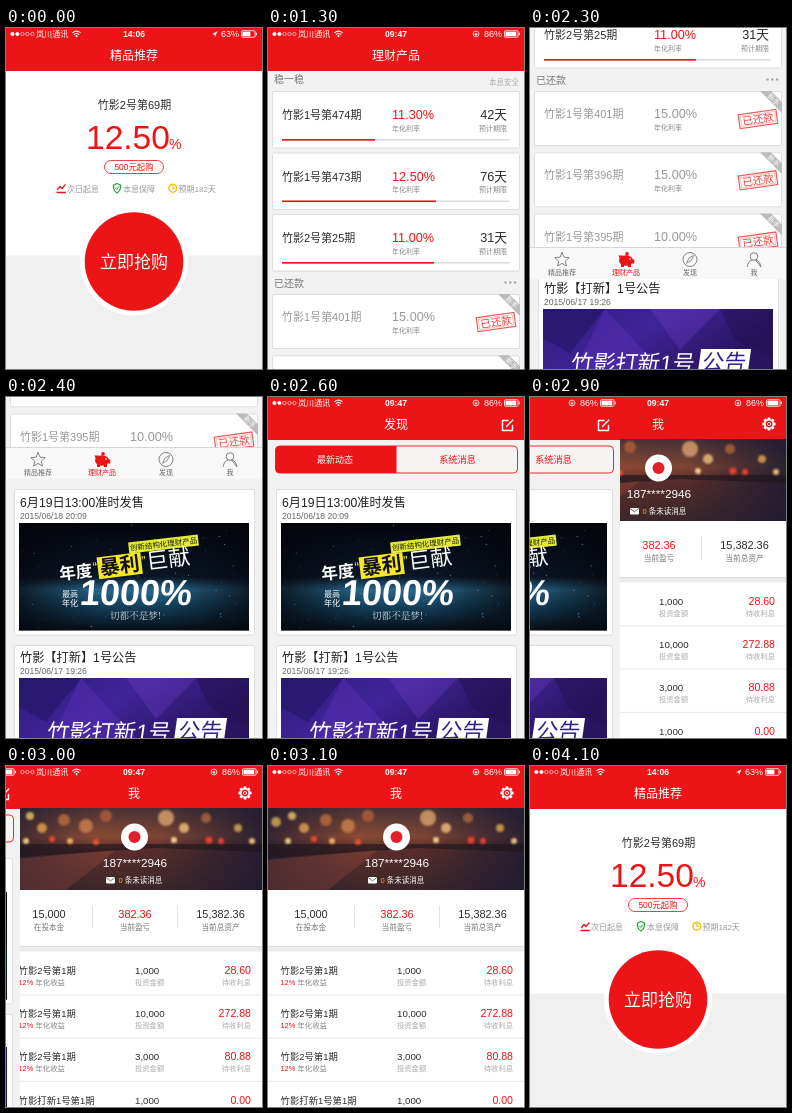
Write an HTML page that moves like this. It is 256x341 px and loops after 4.4 s.

```html
<!DOCTYPE html>
<html lang="zh-CN">
<head>
<meta charset="utf-8">
<title>理财产品</title>
<style>
html, body { margin: 0; width: 100%; height: 100%; overflow: hidden; background: #fff; }
svg { display: block; width: 256px; height: 341px; }
text { font-family: "Liberation Sans", "Noto Sans CJK SC", "Noto Sans CJK", sans-serif; white-space: pre; }
.serif { font-family: "Noto Serif CJK SC", "Noto Sans CJK SC", "Noto Serif", serif; }
.medium { font-weight: 500; }
.bold { font-weight: bold; }
.line { fill: none; stroke-linecap: round; stroke-linejoin: round; }

#home, #list, #news { animation: 4.4s step-end infinite; }
#home { animation-name: home; }
#list { animation-name: list; }
#news { animation-name: news; }
@keyframes home {
  0% { visibility: visible; }
  29.54% { visibility: hidden; }
  93.18%, 100% { visibility: visible; }
}
@keyframes list {
  0% { transform: translateY(0); }
  52.27% { transform: translateY(-203px); }
  54.54% { transform: translateY(-372px); }
  56.81% { transform: translateY(-444px); }
  59.09%, 100% { transform: translateY(-456px); }
}
@keyframes news {
  0% { transform: translateX(0); }
  61.36% { transform: translateX(-5px); }
  63.63% { transform: translateX(-57px); }
  65.9% { transform: translateX(-166px); }
  68.18% { transform: translateX(-242px); }
  70.45%, 100% { transform: translateX(-258px); }
}
</style>
</head>
<body>
<svg id="stage" viewBox="0 0 256 341">
  <defs>
    <linearGradient id="street" x1="0" y1="0" x2="0" y2="1">
      <stop offset="0" stop-color="#4a3236"/>
      <stop offset=".35" stop-color="#8a4a33"/>
      <stop offset=".5" stop-color="#5c2f2b"/>
      <stop offset="1" stop-color="#3d2629"/>
    </linearGradient>
    <linearGradient id="dusk">
      <stop offset="0" stop-color="#1b1a30" stop-opacity=".75"/>
      <stop offset=".35" stop-color="#1b1a30" stop-opacity="0"/>
      <stop offset=".6" stop-color="#1b1a30" stop-opacity=".1"/>
      <stop offset="1" stop-color="#1b1a30" stop-opacity=".85"/>
    </linearGradient>
    <linearGradient id="space" x1="0" y1="0" x2="0" y2="1">
      <stop offset="0" stop-color="#05060c"/>
      <stop offset=".5" stop-color="#0a1626"/>
      <stop offset=".62" stop-color="#28668a"/>
      <stop offset=".76" stop-color="#15435f"/>
      <stop offset="1" stop-color="#060d16"/>
    </linearGradient>
    <linearGradient id="edges">
      <stop offset="0" stop-color="#05060c" stop-opacity=".75"/>
      <stop offset=".35" stop-color="#05060c" stop-opacity="0"/>
      <stop offset=".65" stop-color="#05060c" stop-opacity="0"/>
      <stop offset="1" stop-color="#05060c" stop-opacity=".75"/>
    </linearGradient>
    <linearGradient id="violet" x1="0" y1="0" x2="1" y2=".4">
      <stop offset="0" stop-color="#2f1c7c"/>
      <stop offset=".5" stop-color="#3f2498"/>
      <stop offset="1" stop-color="#28145f"/>
    </linearGradient>
    <clipPath id="photoClip"><rect y="42" width="256" height="82"/></clipPath>
    <filter id="soft"><feGaussianBlur stdDeviation=".8"/></filter>
  </defs>
</svg>
<script>
const RED = '#ec1417', GREY = '#999', DARK = '#2b2b2b';
const MEDIUM = 'class="medium"', BOLD = 'class="bold"';

const text = (x, y, size, fill, str, extra = '') =>
  `<text x="${x}" y="${y}" font-size="${size}" fill="${fill}" ${extra}>${str}</text>`;
const mid = (x, y, size, fill, str, extra = '') => text(x, y, size, fill, str, 'text-anchor="middle" ' + extra);
const end = (x, y, size, fill, str) => text(x, y, size, fill, str, 'text-anchor="end"');
const rect = (x, y, w, h, fill, extra = '') =>
  `<rect x="${x}" y="${y}" width="${w}" height="${h}" fill="${fill}" ${extra}/>`;
const circle = (x, y, r, fill, extra = '') =>
  `<circle cx="${x}" cy="${y}" r="${r}" fill="${fill}" ${extra}/>`;
const line = (d, color, width = 1) =>
  `<path class="line" d="${d}" stroke="${color}" stroke-width="${width}"/>`;
const at = (x, y, body, rot = 0) => `<g transform="translate(${x} ${y}) rotate(${rot})">${body}</g>`;
const slant = (x, y, body, deg = -8) => `<g transform="translate(${x} ${y}) skewX(${deg})">${body}</g>`;
const times = (n, fn) => Array.from({ length: n }, (_, i) => fn(i)).join('');
const card = (x, y, w, h) => rect(x + .5, y + .5, w - 1, h - 1, '#fff', 'rx="1.5" stroke="#dedede"');

function header(title, time, charge, locked) {
  const mark = locked
    ? circle(208, 6, 2.9, 'none', 'stroke="#fff" stroke-width=".8"') + rect(206.8, 5.4, 2.4, 2, '#fff')
    : '<path d="M206 6.3 211.4 3.2 209 9 208.4 6.6Z" fill="#fff"/>';
  const shift = locked ? 1 : 0;
  return rect(0, 0, 256, 43, RED) +
    times(5, i => circle(6.4 + i * 5, 6, 1.7, i < 2 ? '#fff' : 'none', 'stroke="#fff" stroke-width=".6"')) +
    text(30, 9, 8.1, '#fff', '岚川通讯') +
    line('M66.8 4.6Q70.5 1.6 74.2 4.6M68.2 6.4Q70.5 4.6 72.8 6.4', '#fff', 1.1) + circle(70.5, 8.2, 1.1, '#fff') +
    mid(128, 9, 8.6, '#fff', time, BOLD) +
    mark + text(215 + shift, 9, 9, '#fff', charge + '%') +
    at(235.5 + shift, 2.7, rect(0, 0, 13.5, 6.6, 'none', 'rx="1" stroke="#fff" stroke-width=".8"') +
      rect(1, 1, charge * .125, 4.6, '#fff') + rect(14.2, 2, 1.2, 2.6, '#fff')) +
    mid(128, 32, 12, '#fff', title, MEDIUM);
}

function home() {
  const perk = (x, str) => text(x, 163.5, 8, GREY, str);
  return rect(0, 0, 256, 341, '#fff') + header('精品推荐', '14:06', 63) +
    mid(128.5, 81, 11, DARK, '竹影2号第69期') +
    text(80, 121, 33.5, RED, '12.50') + text(163, 121, 14, RED, '%') +
    rect(98.5, 132.5, 59, 13, '#fff', `rx="6.5" stroke="${RED}" stroke-width=".8"`) +
    mid(128, 142, 8.4, RED, '500元起购') +
    line('M51.5 161.5 54 158.5 56 160.5 59 156.8M51 164.5H59.5', RED, 1.3) + perk(61, '次日起息') +
    line('M111 155.5 114.5 157V160Q114 163.2 111 165 108 163.2 107.5 160V157Z', '#23a638', 1.3) +
    line('M109.4 160 110.7 161.4 112.8 158.8', '#23a638') + perk(117, '本息保障') +
    circle(166.8, 160.3, 3.9, '#fff', 'stroke="#f5c518" stroke-width="1.6"') +
    line('M166.8 158V160.5H168.6', '#f0b400') + perk(172.5, '预期182天') +
    rect(0, 227.5, 256, 114, '#f0f0f0') +
    circle(128, 233.5, 54, '#fff') + circle(128, 233.5, 49.3, RED) +
    mid(128, 240, 17, '#fff', '立即抢购');
}

function product(y, name, rate, days, barEnd) {
  return card(4, y, 248, 57.5) +
    text(14, y + 28, 11, DARK, name) +
    text(124, y + 28, 12.7, RED, rate) + text(124, y + 39.5, 7, '#888', '年化利率') +
    end(239, y + 28, 12.7, DARK, days + '天') + end(239, y + 39.5, 7, '#888', '预计期限') +
    rect(14, y + 48, 227, 1.6, '#dcdcdc') + rect(14, y + 48, barEnd - 14, 1.6, RED);
}

function repaid(y, name, rate) {
  const stamp = rect(-19, -7, 38, 14, 'none', 'stroke="#ee5a58" stroke-width="1.2"') +
    rect(-17.2, -5.2, 34.4, 10.4, 'none', 'stroke="#f3908e" stroke-width=".5"') +
    mid(0, 3.8, 10.4, '#ea4340', '已还款', MEDIUM);
  return card(4, y, 248, 55) +
    text(14, y + 27, 11, GREY, name) +
    text(124, y + 27, 12.7, GREY, rate) + text(124, y + 39, 7, '#888', '年化利率') +
    `<path d="M230 ${y}H241L252 ${y + 11}V${y + 22}Z" fill="#bbb"/>` +
    at(243.7, y + 8.4, mid(0, 2.6, 7, '#fff', '新手'), 45) + at(228, y + 28, stamp, -8);
}

function tabBar(y) {
  const labels = ['精品推荐', '理财产品', '发现', '我'], gray = '#777';
  const icons = [
    line('M0 -7 2.1 -2.3 7.2 -1.9 3.3 1.6 4.5 6.6 0 3.9 -4.5 6.6 -3.3 1.6 -7.2 -1.9 -2.1 -2.3Z', gray, .9),
    `<g fill="${RED}"><ellipse cy="1" rx="7" ry="5.2"/><path d="M-7.5-4-3-4-5.5 1ZM5 0H8.3V4H5ZM-5 4H-2V7.5H-5ZM2 4H5V7.5H2Z"/>` +
      circle(1, -5.6, 1.8, RED) + '</g>' + circle(4, -.6, .8, '#fff'),
    circle(0, 0, 7, 'none', `stroke="${gray}" stroke-width=".9"`) + line('M3.6 -3.8 1.1 1.2 -3.6 3.8 -1.1 -1.2Z', gray, .8),
    circle(0, -3, 3.8, 'none', `stroke="${gray}" stroke-width=".9"`) + line('M-6.8 7Q-6 1.3 -2 .6M2 .6Q6 1.3 6.8 7Z', gray, .9)
  ];
  return rect(0, y, 256, 32, '#f8f8f8') + rect(0, y, 256, .7, '#c8c8c8') +
    labels.map((s, i) => at(32 + i * 64, y + 12.5, icons[i]) +
      mid(32 + i * 64, y + 28, 7, i === 1 ? RED : '#666', s)).join('');
}

function list() {
  const open = [['1号第474', '11.30%', 42, 107], ['1号第473', '12.50%', 76, 168], ['2号第25', '11.00%', 31, 166]];
  const done = [['401', '15.00%'], ['396', '15.00%'], ['395', '10.00%']];
  return rect(0, 0, 256, 454, '#f2f2f2') + header('理财产品', '09:47', 86, true) +
    text(6, 55, 10, '#777', '稳一稳') + end(251, 57, 7.5, '#aaa', '本息安全') +
    open.map(([n, rate, days, bar], i) => product(63 + i * 61.5, `竹影${n}期`, rate, days, bar)).join('') +
    text(6, 258.5, 10, '#777', '已还款') + times(3, i => circle(237.5 + i * 4.8, 254.5, 1.2, '#aaa')) +
    done.map(([n, rate], i) => repaid(266 + i * 61.3, `竹影1号第${n}期`, rate)).join('') +
    tabBar(422);
}

function promo() {
  let seed = 7;
  const rnd = () => (seed = seed * 16807 % 2147483647) / 2147483647;
  const yellow = '#f4e62a';
  const slogan = text(0, 0, 16.5, '#fff', '年度', BOLD) +
    rect(39, -18, 44, 22, yellow) + text(41, 0, 20, '#111', '暴利', BOLD) +
    text(34, -4, 14, yellow, '“') + text(83, -4, 14, yellow, '”') +
    text(88, 0, 22, '#fff', '巨献', MEDIUM);
  const tag = rect(-35, -5.5, 70, 11, '#e3ea3c') + mid(0, 2.8, 7.5, '#1a1d0c', '创新结构化理财产品', MEDIUM);
  return rect(13, 126, 230, 107.5, 'url(#space)') + rect(13, 126, 230, 107.5, 'url(#edges)') +
    times(60, () => circle(15 + rnd() * 226, 128 + rnd() * 103, .3 + rnd() * .4, '#7fb4d8', 'opacity=".6"')) +
    at(157.5, 147, tag, -6.5) + at(54, 183, slogan, -7) +
    text(56, 200, 8, '#fff', '最高', MEDIUM) + text(56, 208.5, 8, '#fff', '年化', MEDIUM) +
    slant(73, 208, text(0, 0, 36, '#fff', '1000%', BOLD), -5) +
    text(104, 221.5, 9.6, '#cfd6dc', '切都不是梦!', 'class="serif"');
}

function notice() {
  return rect(13, 281, 230, 60, 'url(#violet)') +
    '<path d="M13 281H75L40 325 13 310Z" fill="#221567" opacity=".6"/>' +
    '<path d="M75 281 130 341H45Z" fill="#5a32b8" opacity=".45"/>' +
    '<path d="M120 281H190L150 322Z" fill="#6d3cc4" opacity=".35"/>' +
    '<path d="M190 281H243V330L205 312Z" fill="#221050" opacity=".5"/>' +
    slant(40, 342.5, text(0, 0, 22.3, '#fff', '竹影打新1号', MEDIUM)) +
    slant(168, 343, rect(0, -22, 50, 24, '#fff') + text(3, -1.5, 22, '#33208a', '公告', MEDIUM));
}

function news() {
  const post = (y, title, date) =>
    text(14, y, 12.2, '#222', title, MEDIUM) + text(14, y + 12.5, 8.6, '#666', date);
  return rect(0, 0, 256, 341, '#f2f2f2') + header('发现', '09:47', 86, true) +
    line('M240 23.5H234.5V33.5H244.5V28.5M238.5 29.5 244.8 23', '#fff', 1.4) +
    rect(7.5, 49, 242, 27, '#f8f3f3', `rx="4" stroke="${RED}" stroke-width=".9"`) +
    `<path d="M12 49H128.5V76H12Q7.5 76 7.5 72V53Q7.5 49 12 49Z" fill="${RED}"/>` +
    mid(67, 65.5, 9, '#fff', '最新动态') + mid(189.5, 65.5, 9.2, RED, '系统消息') +
    card(8, 92, 241, 146.5) + post(109.5, '6月19日13:00准时发售', '2015/06/18 20:09') + promo() +
    card(8, 248, 241, 110) + post(264.5, '竹影【打新】1号公告', '2015/06/17 19:26') + notice();
}

function photo() {
  // x, y, radius, colour
  const lights = [[8, 56, 5, '#c9a050'], [24, 50, 4, '#e0b866'], [36, 62, 5, '#d99a4a'], [58, 54, 6, '#b5683a'],
    [80, 60, 7, '#c47b48'], [100, 50, 6, '#a95c3c'], [46, 73, 3, '#ff4a30'], [20, 75, 3, '#ffd98a'],
    [64, 75, 3, '#ffc067'], [90, 76, 3, '#f0573a'], [160, 52, 8, '#d09a6a'], [178, 62, 5, '#e8b877'],
    [200, 52, 5, '#a5623f'], [168, 74, 3, '#ffe0a0'], [203, 74, 3.5, '#ff4030'], [215, 75, 3, '#ff4030'],
    [232, 62, 4, '#d2a050'], [246, 75, 3, '#ffce80']];
  return `<g clip-path="url(#photoClip)">${rect(0, 42, 256, 82, 'url(#street)') + rect(0, 42, 256, 82, 'url(#dusk)')}` +
    '<path d="M0 78H256V86L150 82 0 92Z" fill="#1d1419" opacity=".6"/>' +
    '<path d="M0 94 110 84 60 124H0Z" fill="#a5523c" opacity=".3"/>' +
    `<g filter="url(#soft)" opacity=".88">${lights.map(([x, y, r, c]) => circle(x, y, r, c)).join('')}</g></g>`;
}

function account() {
  const gear = times(8, i => `<path d="M-1.3-6.6H1.3L1.7-4H-1.7Z" fill="#fff" transform="rotate(${i * 45})"/>`) +
    circle(0, 0, 4.1, RED, 'stroke="#fff" stroke-width="1.3"') + circle(0, 0, 1.6, RED, 'stroke="#fff"');
  const stats = [[43, '15,000', '在投本金', DARK], [129, '382.36', '当前盈亏', RED], [214.5, '15,382.36', '当前总资产', DARK]];
  const rows = [['2号', '1,000', '28.60'], ['2号', '10,000', '272.88'], ['2号', '3,000', '80.88'], ['打新1号', '1,000', '0.00']];
  return rect(0, 0, 256, 341, '#fff') + header('我', '09:47', 86, true) + at(239, 27, gear) + photo() +
    circle(128.5, 71, 13.5, '#fff') + circle(128.5, 71, 6, '#e0202a') +
    mid(129, 101, 11.8, '#fff', '187****2946') +
    rect(100, 111, 9, 6.4, '#fff', 'rx=".8"') + line('M100.5 111.8 104.5 114.8 108.5 111.8', '#5a4a48', .8) +
    text(112.5, 117.3, 7.5, '#fff', '<tspan fill="#f7a52b">0</tspan> 条未读消息') +
    stats.map(([x, n, label, c]) => mid(x, 152, 10.9, c, n) + mid(x, 163.5, 7.6, '#777', label)).join('') +
    rect(86, 140, .8, 22, '#ddd') + rect(171, 140, .8, 22, '#ddd') +
    rect(0, 180, 256, 5.5, '#ececec') + rect(0, 180, 256, .7, '#d9d9d9') +
    rows.map(([n, sum, gain], i) => {
      const y = 208 + i * 43.2;
      return text(12.5, y, 9.4, DARK, `竹影${n}第1期`) +
        text(12.5, y + 11, 7.4, '#888', `<tspan fill="${RED}">12%</tspan> 年化收益`) +
        text(129, y, 9.7, DARK, sum) + text(129, y + 11, 7.3, '#aaa', '投资金额') +
        end(245, y, 10.6, RED, gain) + end(245, y + 11, 7.3, '#aaa', '待收利息') +
        rect(0, y + 20.5, 256, .8, '#e2e2e2');
    }).join('');
}

// Bottom to top: each page slides away to uncover the one beneath.
const pages = { account, news, list, home };
document.getElementById('stage').innerHTML +=
  Object.entries(pages).map(([id, draw]) => `<g id="${id}">${draw()}</g>`).join('');
</script>
</body>
</html>
```
